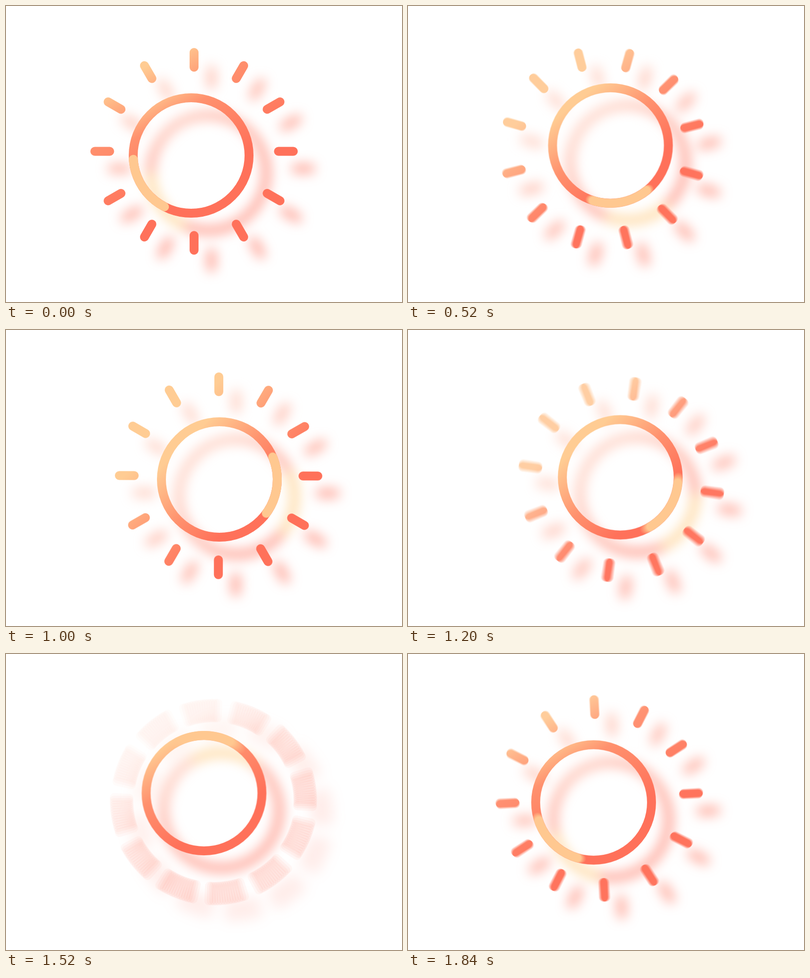
Animation, 800 px wide and 600 px high, one loop 1.88 s. Source, as an HTML page with a canvas:

```html
<!DOCTYPE html>
<html lang="en">
<head>
<meta charset="utf-8">
<title>Sun</title>
<style>
  html, body { margin: 0; width: 100%; height: 100%; overflow: hidden; background: #fff; }
  canvas { display: block; width: 800px; height: 600px; }
</style>
</head>
<body>
<canvas id="stage" width="800" height="600"></canvas>
<script>
const W = 800, H = 600, TAU = Math.PI * 2, DEG = Math.PI / 180;
const LOOP = 1880, STEP = 40, TURN = 1080, END = 1920;
const SHUTTER = 18, SAMPLES = 15;

const stage = document.getElementById('stage').getContext('2d');
const makeLayer = () => {
  const c = document.createElement('canvas');
  c.width = W;
  c.height = H;
  return c.getContext('2d');
};
const tinted = makeLayer(), shadow = makeLayer();
const masks = { rays: makeLayer(), ring: makeLayer(), arc: makeLayer() };

const clamp = v => Math.max(0, Math.min(1, v));
const lerp = (a, b, k) => a + (b - a) * k;
const mix = (a, b, k) => a.map((v, i) => lerp(v, b[i], k));
const rgb = c => `rgb(${c.map(Math.round).join()})`;
const smooth = (t, from, to) => {
  const u = clamp((t - from) / (to - from));
  return u * u * (3 - 2 * u);
};

// Cubic-bezier ease (.63, 0, .34, 1)
function snap(u) {
  u = clamp(u);
  let lo = 0, hi = 1;
  for (let i = 0; i < 24; i++) {
    const s = (lo + hi) / 2;
    if (1.89 * s - 2.76 * s * s + 1.87 * s ** 3 < u) lo = s; else hi = s;
  }
  return lo * lo * (3 - 2 * lo);
}

// Ray hub: time, x, y
const HUB = [
  [0, 380, 294.5], [180, 373.5, 302.5], [320, 373.5, 302.5], [500, 392, 290.5],
  [680, 407.5, 282.5], [840, 420, 286.5], [1000, 429.5, 295.5], [1160, 431, 302.5],
  [1360, 429, 302.7], [1520, 419.5, 300.3], [1680, 404, 296.3], [1840, 386.5, 292.8],
  [1920, 380, 294.5]
];

function hubAt(t) {
  t = Math.max(0, Math.min(END, t));
  let i = 0;
  while (i < HUB.length - 2 && t > HUB[i + 1][0]) i++;
  const a = HUB[i], b = HUB[i + 1], span = b[0] - a[0], u = (t - a[0]) / span;
  const slope = (j, k) => {
    const p = HUB[Math.max(0, j - 1)], n = HUB[Math.min(HUB.length - 1, j + 1)];
    return (n[k] - p[k]) / (n[0] - p[0]) * span;
  };
  return [1, 2].map(k => {
    const h = u * u * (3 - 2 * u);
    return lerp(a[k], b[k], h) + slope(i, k) * u * (1 - u) ** 2 - slope(i + 1, k) * u * u * (1 - u);
  });
}

const spinAt = t => t < TURN
  ? -30 * snap(t / TURN)
  : -30 + 390 * snap((t - TURN) / (END - TURN));

const arcAngle = t => t < TURN
  ? 146.8 - 142.6 * smooth(t, 0, TURN)
  : 4.2 + 502.6 * smooth(t, TURN, END);

// The ring hops right and back along the same arch
function ringAt(t) {
  const s = smooth(t, 0, 920) - smooth(t, TURN, END), r = 1 - s;
  return [
    374 + 36 * s * r * r + 135 * s * s * r + 57 * s ** 3,
    303 - 84 * s * r
  ];
}

function drawRays(c, t) {
  const [x, y] = hubAt(t), turn = spinAt(t);
  for (let i = 0; i < 12; i++) {
    const a = (turn + i * 30) * DEG, dx = Math.cos(a), dy = Math.sin(a);
    c.moveTo(x + 170.5 * dx, y + 170.5 * dy);
    c.lineTo(x + 200.5 * dx, y + 200.5 * dy);
  }
}

function drawRing(c, t) {
  const [x, y] = ringAt(t);
  c.arc(x, y, 117, 0, TAU);
}

function drawArc(c, t) {
  const [x, y] = ringAt(t), mid = arcAngle(t);
  c.arc(x, y, 117, (mid - 29.4) * DEG, (mid + 29.4) * DEG);
}

// Coverage averaged over the open shutter
function expose(c, draw, t) {
  c.globalCompositeOperation = 'source-over';
  c.clearRect(0, 0, W, H);
  c.globalCompositeOperation = 'lighter';
  c.strokeStyle = `rgba(0,0,0,${1 / SAMPLES})`;
  c.lineWidth = 18;
  c.lineCap = 'round';
  for (let i = 0; i < SAMPLES; i++) {
    c.beginPath();
    draw(c, t + ((i + 0.5) / SAMPLES - 0.5) * SHUTTER);
    c.stroke();
  }
}

function paint(target, mask, fill, alpha = 1) {
  tinted.globalCompositeOperation = 'source-over';
  tinted.clearRect(0, 0, W, H);
  tinted.drawImage(mask.canvas, 0, 0);
  tinted.globalCompositeOperation = 'source-in';
  tinted.fillStyle = fill;
  tinted.fillRect(0, 0, W, H);
  target.globalAlpha = alpha;
  target.drawImage(tinted.canvas, 0, 0);
  target.globalAlpha = 1;
}

const LIGHT = [255, 204, 147], DARK = [255, 113, 90];
const PALE = [255, 203, 187], SHADE = [255, 184, 162];

// glow 0: light only at the top left; glow 1: light over half the sun
function sunGradient([x, y], scale, glow, light) {
  const a = lerp(60, 45, glow * glow) * DEG, reach = 200 * scale;
  const dx = Math.cos(a) * reach, dy = Math.sin(a) * reach;
  const g = stage.createLinearGradient(x - dx, y - dy, x + dx, y + dy);
  const stop = (p, k) => g.addColorStop((p + 200) / 400, rgb(mix(DARK, light, k)));
  stop(lerp(-198, -135, glow), 1);
  stop(lerp(-115, 0, glow), 0.35);
  stop(lerp(60, 110, glow), 0);
  return g;
}

function render(t) {
  const hub = hubAt(t), ring = ringAt(t);
  const glow = smooth(t, 80, 720) - smooth(t, TURN, END);
  const speed = Math.abs(spinAt(t + 10) - spinAt(t - 10)) * 2;
  const haze = clamp(speed / 20);

  expose(masks.rays, drawRays, t);
  expose(masks.ring, drawRing, t);
  expose(masks.arc, drawArc, t);

  const rayAlpha = 1 - 0.14 * haze;
  shadow.clearRect(0, 0, W, H);
  paint(shadow, masks.rays, sunGradient(hub, 1, glow, SHADE), rayAlpha);
  paint(shadow, masks.ring, sunGradient(ring, 0.75, glow, SHADE));
  paint(shadow, masks.arc, '#ffc673');

  stage.fillStyle = '#fff';
  stage.fillRect(0, 0, W, H);
  stage.filter = 'blur(12px)';
  stage.globalAlpha = 0.6;
  stage.drawImage(shadow.canvas, 35, 35);
  stage.filter = 'none';
  stage.globalAlpha = 1;

  paint(stage, masks.rays, sunGradient(hub, 1, glow, mix(LIGHT, PALE, haze)), rayAlpha);
  paint(stage, masks.ring, sunGradient(ring, 0.75, glow, LIGHT));
  paint(stage, masks.arc, '#ffc890');
}

const start = performance.now();
let shown = -1;
function tick() {
  const t = Math.floor((performance.now() - start) % LOOP / STEP) * STEP;
  if (t !== shown) render(shown = t);
  requestAnimationFrame(tick);
}
tick();
</script>
</body>
</html>
```
